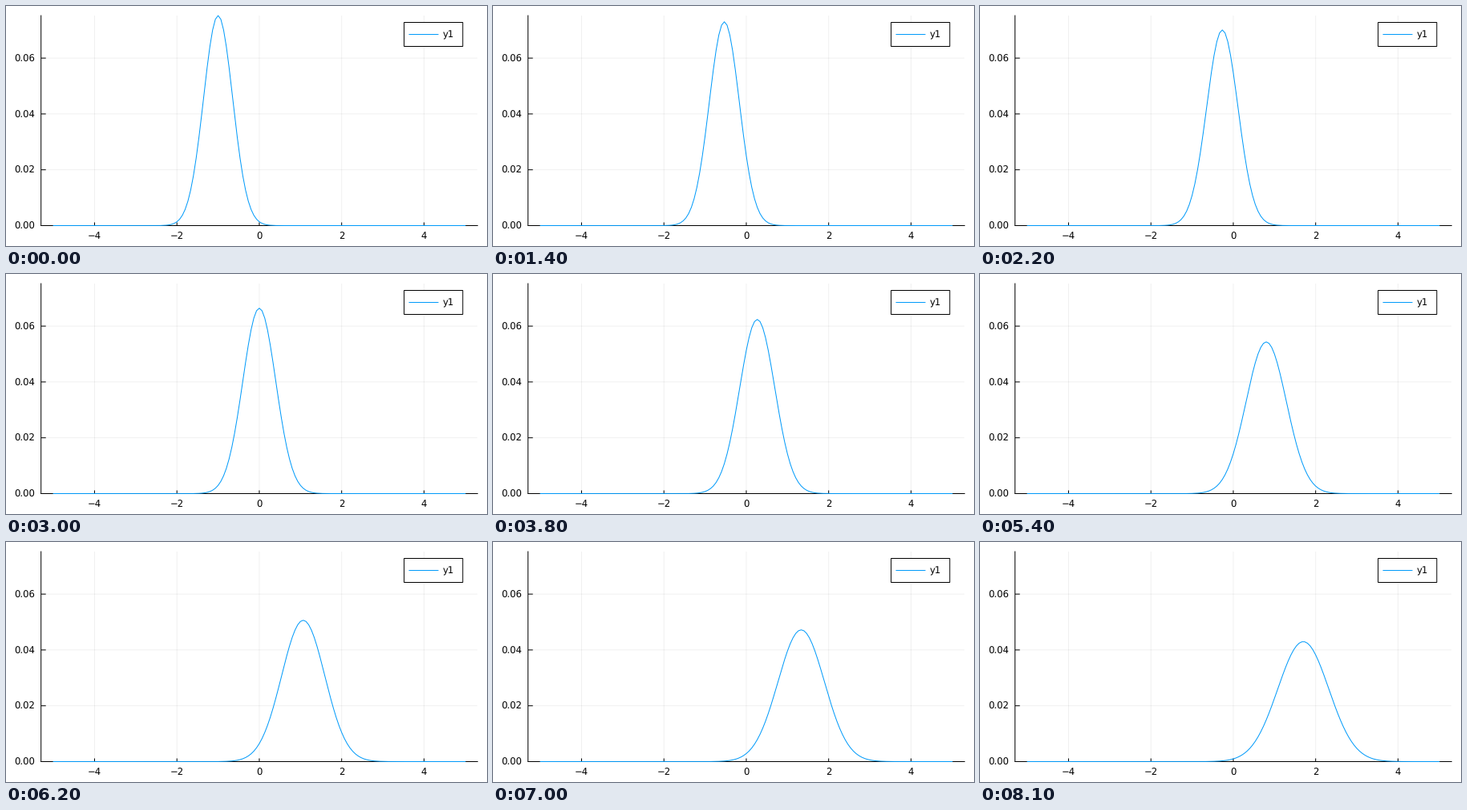
A matplotlib script that plays this animation: 600 by 300 pixels, repeating every 8200 ms.

```python
import numpy as np
import matplotlib.pyplot as plt
from matplotlib.animation import FuncAnimation
from matplotlib.lines import Line2D
from matplotlib.patches import Rectangle

WIDTH, HEIGHT, DPI = 600, 300, 100
FRAMES, INTERVAL = 82, 100
PX = 72 / DPI  # one pixel in points
FONT_SIZE = 11.6 * PX
BLUE = "#009AFA"
LEFT, RIGHT, TOP, BOTTOM = 43.7, 588.2, 12, 274.5

plt.rcParams["font.family"] = "DejaVu Sans"
plt.rcParams["text.hinting"] = "none"
plt.rcParams["path.snap"] = False

x = np.linspace(-5, 5, 151)
dx = x[1] - x[0]
X_LIMIT = 5.3
PEAK = dx * np.sqrt(4 / np.pi)


def density(step):
    """Probability per cell of a free, spreading Gaussian wave packet."""
    center = -1 + step / 30
    spread = 1 + (step / 56.4) ** 2
    return PEAK / np.sqrt(spread) * np.exp(-4 * (x - center) ** 2 / spread)


fig = plt.figure(figsize=(WIDTH / DPI, HEIGHT / DPI), dpi=DPI, facecolor="white")
ax = fig.add_axes([LEFT / WIDTH, 1 - BOTTOM / HEIGHT,
                   (RIGHT - LEFT) / WIDTH, (BOTTOM - TOP) / HEIGHT])
ax.set_xlim(-X_LIMIT, X_LIMIT)
ax.set_ylim(0, PEAK)
ax.spines[["top", "right"]].set_visible(False)
ax.spines[["left", "bottom"]].set_linewidth(PX)
x_ticks, y_ticks = [-4, -2, 0, 2, 4], [0, 0.02, 0.04, 0.06]
ax.set_xticks(x_ticks)
ax.set_yticks(y_ticks)
ax.yaxis.set_major_formatter("{x:.2f}")
ax.tick_params(length=0, labelsize=FONT_SIZE)
ax.tick_params(axis="x", pad=7.8 * PX)
ax.tick_params(axis="y", pad=7.5 * PX)
ax.grid(color="black", alpha=0.06, linewidth=PX)
ax.set_axisbelow(True)

# Inward tick marks, drawn as lines so they keep their subpixel places
ax.vlines(x_ticks, 0, 4 * PEAK / (BOTTOM - TOP), color="black", linewidth=PX)
ax.hlines(y_ticks, -X_LIMIT, -X_LIMIT + 6 * 2 * X_LIMIT / (RIGHT - LEFT),
          color="black", linewidth=PX)

curve, = ax.plot(x, density(0), color=BLUE, linewidth=PX, zorder=5, clip_on=False)

# Legend, laid out in stage pixels with y pointing down
stage = fig.add_axes([0, 0, 1, 1])
stage.set_xlim(0, WIDTH)
stage.set_ylim(HEIGHT, 0)
stage.axis("off")
stage.add_patch(Rectangle((496.6, 20.5), 73.2, 30, facecolor="white",
                          edgecolor="black", linewidth=PX))
stage.add_line(Line2D([503, 539], [35.5, 35.5], color=BLUE, linewidth=PX))
stage.text(544.6, 40, "y1", fontsize=FONT_SIZE, va="baseline")


def update(step):
    curve.set_ydata(density(step))
    return curve,


anim = FuncAnimation(fig, update, frames=FRAMES, interval=INTERVAL,
                     repeat=True, repeat_delay=0)
plt.show()
```
